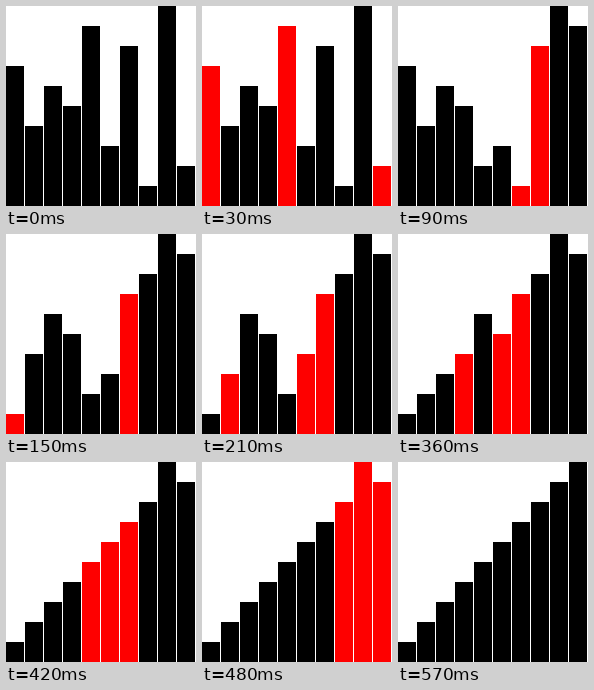
Recreate the animation shown at these times as a matplotlib script. Size 190 by 200 pixels, loop 2.57 s.

```python
import matplotlib.pyplot as plt
from matplotlib.animation import FuncAnimation

WIDTH, HEIGHT, DPI = 190, 200, 100
PITCH, BAR, UNIT = 19, 18, 20
LOOP_MS, INTERVAL, TICK_MS = 2570, 10, 30

START = [7, 4, 6, 5, 9, 3, 8, 1, 10, 2]
PIVOT_BAR = 6
BLACK, RED = "black", "#fe0000"


def quicksort(values, lo, hi):
    """Sort in place, yielding the highlighted bars at each step."""
    if lo >= hi:
        return
    bounds = {lo, (lo + hi) // 2, hi}
    yield bounds

    # Ranges at the left edge share one pivot bar, others use their first
    pivot = values[PIVOT_BAR if lo == 0 else lo]
    i, j = lo, hi
    swapped = False
    while True:
        while values[i] < pivot:
            i += 1
        while values[j] > pivot:
            j -= 1
        if i >= j:
            break
        values[i], values[j] = values[j], values[i]
        swapped = True
        yield {i, j, hi} if lo > 0 else {i, j}
        i += 1
        j -= 1

    # A longer range that was already split stays lit a little longer
    if not swapped and hi - lo > 1:
        yield bounds
    yield from quicksort(values, lo, j)
    yield from quicksort(values, j + 1, hi)


def record():
    """Return (values, highlighted bars) for every tick."""
    values = START[:]
    states = [(START, set())]
    for marks in quicksort(values, 0, len(values) - 1):
        done = values == sorted(values)
        states.append((values[:], set() if done else marks))
    return states


states = record()

fig = plt.figure(figsize=(WIDTH / DPI, HEIGHT / DPI), dpi=DPI, facecolor="white")
ax = fig.add_axes([0, 0, 1, 1])
ax.axis("off")
bars = ax.bar([i * PITCH for i in range(len(START))],
              [v * UNIT for v in START],
              width=BAR, align="edge", color=BLACK,
              linewidth=0, antialiased=False)
ax.set_xlim(0, WIDTH)
ax.set_ylim(0, HEIGHT)


def draw(frame):
    tick = min(frame * INTERVAL // TICK_MS, len(states) - 1)
    values, marks = states[tick]
    for i, (bar, value) in enumerate(zip(bars, values)):
        bar.set_height(value * UNIT)
        bar.set_facecolor(RED if i in marks else BLACK)
    return list(bars)


anim = FuncAnimation(fig, draw, frames=LOOP_MS // INTERVAL, interval=INTERVAL,
                     init_func=lambda: draw(0), repeat=True, repeat_delay=0)
plt.show()
```
